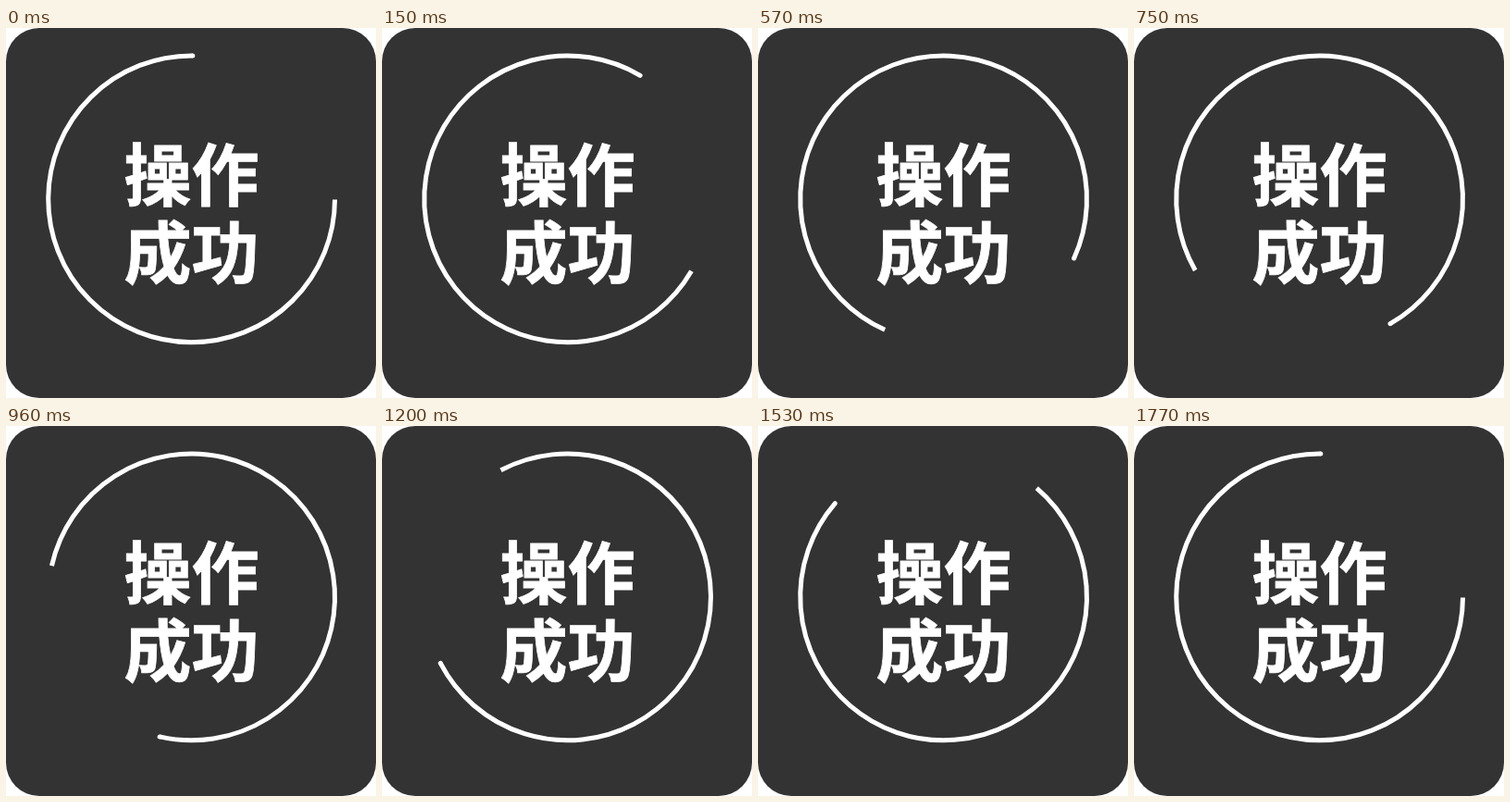
Write an HTML page that moves like this. It is 400 by 400 pixels and loops after 1800 ms.

```html
<!DOCTYPE html>
<html lang="zh-CN">
<head>
<meta charset="utf-8">
<style>
  html, body { margin: 0; width: 100%; height: 100%; overflow: hidden; background: #fff; }
  svg { display: block; width: 100vw; height: 100vh; }
  text {
    font: 700 73px "Noto Sans CJK SC", "Noto Sans CJK", sans-serif;
    fill: #fff;
    stroke: #fff;
    stroke-width: 0.8px;
    text-anchor: middle;
  }
</style>
</head>
<body>
<svg viewBox="0 0 400 400">
  <rect width="400" height="400" rx="36" fill="#333"/>
  <g id="ring" fill="none" stroke="#fff" stroke-width="5">
    <path id="arc"/>
    <circle id="cap" r="2.5" fill="#fff" stroke="none"/>
  </g>
  <text x="200.6" y="185.8">操作</text>
  <text x="200.6" y="269.6">成功</text>
</svg>
<script>
  const CX = 200.6, CY = 184.9, R = 154.9;
  const LOOP = 1800, STEP = 30;
  const ring = document.getElementById('ring');

  // Three quarters of a circle: flat end at the right, round end at the top.
  const tipX = CX + 1.2, tipY = CY - R;
  document.getElementById('arc').setAttribute('d',
    `M${CX + R} ${CY + 0.5}A${R} ${R} 0 1 1 ${tipX} ${tipY}`);
  const cap = document.getElementById('cap');
  cap.setAttribute('cx', tipX);
  cap.setAttribute('cy', tipY);

  // Two half turns, the second one a step shorter.
  const angleAt = step => step <= 30 ? step * 6 : 180 + (step - 30) * 180 / 29;

  function draw(time) {
    const step = Math.floor((time % LOOP) / STEP);
    ring.setAttribute('transform', `rotate(${angleAt(step)} ${CX} ${CY})`);
  }

  const start = performance.now();
  function tick() {
    draw(performance.now() - start);
    requestAnimationFrame(tick);
  }
  draw(0);
  requestAnimationFrame(tick);
</script>
</body>
</html>
```
